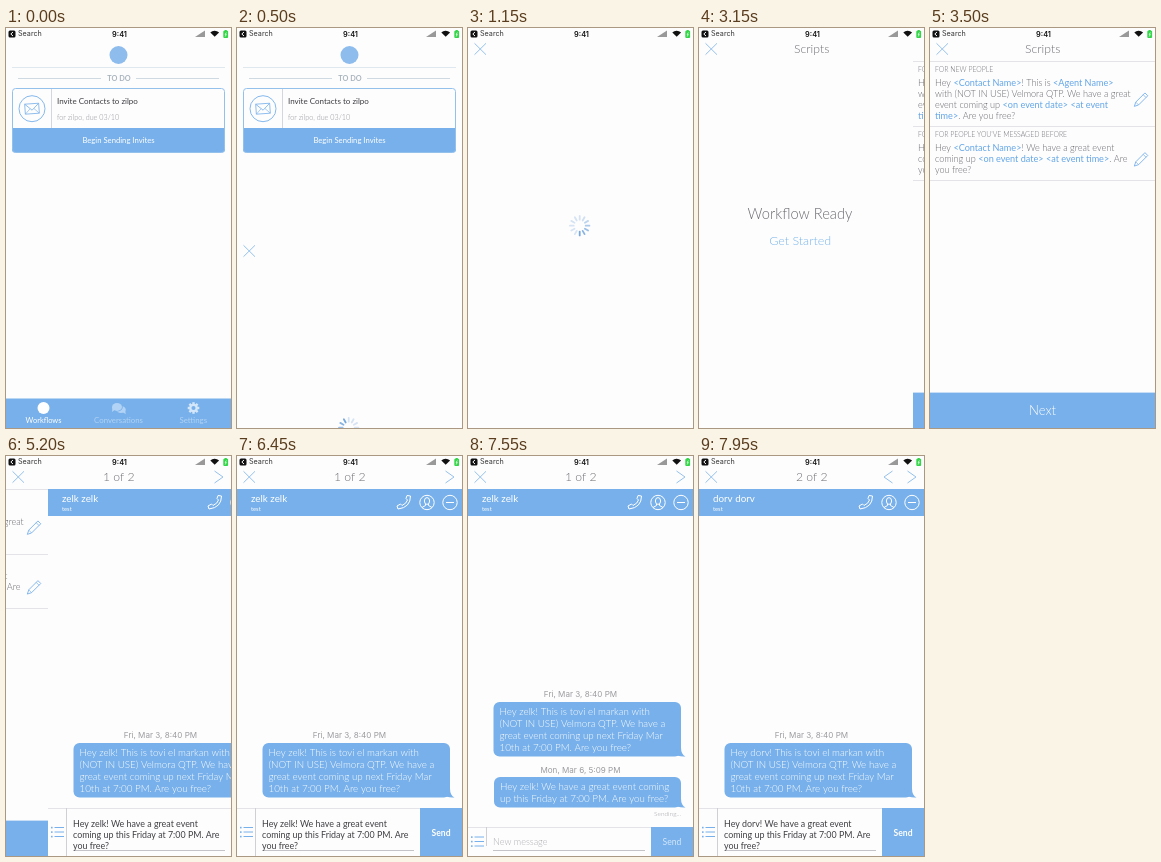
These frames come from a looping animation (225x400 px, 8 s). An HTML page with a canvas:

```html
<!DOCTYPE html>
<html lang="en">
<head>
<meta charset="utf-8">
<title>Messaging workflow</title>
<style>
html, body { margin: 0; width: 100%; height: 100%; overflow: hidden; background: #fefdfe; }
canvas { display: block; width: 100vw; height: 100vh; }
</style>
</head>
<body>
<canvas id="stage"></canvas>
<script>
const W = 225, H = 400, LOOP = 8000;
const BLUE = '#77b0ea', PALE = '#94c1ec', PAPER = '#fefdfe', RULE = '#e4e4e8', WHITE = '#fff';
const canvas = document.getElementById('stage');
const c = canvas.getContext('2d');

const clamp = v => Math.max(0, Math.min(1, v));
const easeOut = v => 1 - Math.pow(1 - v, 3);
const glide = (t, start, length) => easeOut(clamp((t - start) / length));
const mix = (a, b, k) => a + (b - a) * k;

function at(x, y, draw) {
  c.save();
  c.translate(x, y);
  draw();
  c.restore();
}

function box(x, y, w, h, color) {
  c.fillStyle = color;
  c.fillRect(x, y, w, h);
}

function roundBox(x, y, w, h, r) {
  c.beginPath();
  c.roundRect(x, y, w, h, r);
}

function line(color, width, ...p) {
  c.strokeStyle = color;
  c.lineWidth = width;
  c.beginPath();
  for (let i = 0; i < p.length; i += 2) c.lineTo(p[i], p[i + 1]);
  c.stroke();
}

function disc(x, y, r, color) {
  c.fillStyle = color;
  c.beginPath();
  c.arc(x, y, r, 0, 7);
  c.fill();
}

function ring(x, y, r, color, width = 1) {
  c.strokeStyle = color;
  c.lineWidth = width;
  c.beginPath();
  c.arc(x, y, r, 0, 7);
  c.stroke();
}

function text(str, x, y, size, color, weight = 400, align = 'left', family = 'Lato') {
  c.font = `${weight} ${size}px ${family}, sans-serif`;
  c.fillStyle = color;
  c.textAlign = align;
  c.fillText(str, x, y);
}

// Placeholders in angle brackets are set in blue.
function script(str, x, y) {
  for (const run of str.split(/(<[^>]*>?|^[a-z]+>)/)) {
    if (!run) continue;
    const field = /[<>]/.test(run);
    text(run, x, y, 9.1, field ? '#62a6e6' : '#66666b', field ? 400 : 300);
    x += c.measureText(run).width;
  }
}

function statusBar() {
  c.fillStyle = '#111';
  roundBox(2.5, 2.5, 7, 7, 1.5);
  c.fill();
  line(WHITE, 1, 7, 4, 4.8, 6, 7, 8);
  text('Search', 12, 8.4, 7.2, '#333', 400, 'left', 'Inter');
  text('9:41', 113.5, 8.6, 7.4, '#111', 600, 'center', 'Inter');
  c.fillStyle = '#999';
  c.beginPath();
  c.moveTo(189, 9);
  c.lineTo(199, 9);
  c.lineTo(199, 2.5);
  c.fill();
  c.fillStyle = '#111';
  c.beginPath();
  c.moveTo(208.7, 8.7);
  c.arc(208.7, 8.7, 6, -Math.PI * .76, -Math.PI * .24);
  c.fill();
  c.fillStyle = '#35d54a';
  roundBox(217.3, 2.8, 4.8, 7.2, 1);
  c.fill();
  box(218.6, 2, 2.2, 1, '#35d54a');
  line('#eaffea', .8, 220.3, 4.5, 219.2, 6.5, 220.3, 6.5, 219.2, 8.5);
}

function envelope() {
  at(26, 80.7, () => {
    c.rotate(-.07);
    c.strokeStyle = BLUE;
    c.lineWidth = .8;
    c.strokeRect(-7, -5, 14, 10);
    line(BLUE, .8, -7, -5, 0, 1.5, 7, -5);
    line(BLUE, .6, -7, 5, -2, 0);
    line(BLUE, .6, 7, 5, 2, 0);
  });
}

function gear(x, y, color) {
  for (let i = 0; i < 8; i++) {
    at(x, y, () => {
      c.rotate(i * Math.PI / 4);
      box(-1.2, -5.8, 2.4, 3, color);
    });
  }
  ring(x, y, 3.2, color, 2.3);
}

function talk(x, y, color) {
  const bubble = (dx, dy, rx, ry, side) => {
    c.beginPath();
    c.ellipse(x + dx, y + dy, rx, ry, 0, 0, 7);
    c.fill();
    c.beginPath();
    c.moveTo(x + dx + side * 1, y + dy + 2);
    c.lineTo(x + dx + side * rx, y + dy + ry + 1.2);
    c.lineTo(x + dx + side * (rx - .5), y + dy);
    c.fill();
  };
  c.fillStyle = color;
  bubble(2.5, 1.5, 4.7, 3.6, 1);
  c.fillStyle = BLUE;
  c.beginPath();
  c.ellipse(x - 1.5, y - 1, 5.8, 4.6, 0, 0, 7);
  c.fill();
  c.fillStyle = color;
  bubble(-1.5, -1, 5, 3.9, -1);
}

function home() {
  disc(112.5, 27, 9, '#8dbced');
  line('#dfe7ef', 1, 6, 39.5, 219, 39.5);
  line('#ced9e1', 1, 12, 50.5, 95, 50.5);
  line('#ced9e1', 1, 130, 50.5, 213, 50.5);
  text('TO DO', 113, 52.8, 7.3, '#a9b4bd', 700, 'center');

  c.save();
  roundBox(6, 60.5, 213, 64, 3);
  c.clip();
  box(6, 100, 214, 26, BLUE);
  c.restore();
  c.strokeStyle = PALE;
  c.lineWidth = 1;
  roundBox(6.5, 60.5, 212, 64, 3);
  c.stroke();
  line('#d3d6da', 1, 45.5, 61, 45.5, 100);
  ring(26, 80.7, 13, BLUE, .9);
  envelope();
  text('Invite Contacts to zilpo', 51, 75.8, 8, '#3c3c40');
  text('for zilpo, due 03/10', 51, 91.5, 7.2, '#8f8f94', 300);
  text('Begin Sending Invites', 112.5, 115, 7.7, WHITE, 400, 'center');

  const dim = '#b2d3f5';
  box(0, 370.5, W, 29.5, BLUE);
  disc(37.5, 380, 6, WHITE);
  talk(112.5, 380, dim);
  gear(187.5, 380, '#d3e6fa');
  text('Workflows', 37.5, 394.8, 7.5, WHITE, 400, 'center');
  text('Conversations', 112.5, 394.6, 7.8, dim, 400, 'center');
  text('Settings', 187.3, 394.6, 7.9, dim, 400, 'center');
}

function spinner(t) {
  const head = (Math.floor(t * 12 / 1000) + 5) % 12;
  for (let i = 0; i < 12; i++) {
    const age = (head - i + 12) % 12;
    at(111.7, 197.7, () => {
      c.rotate(i * Math.PI / 6);
      c.lineCap = 'round';
      c.globalAlpha *= Math.max(.3, 1 - age * .13);
      line('#78a9dc', 1.8, 0, -6, 0, -9.7);
    });
  }
}

function readyPage(t) {
  const shown = clamp((t - 1700) / 300);
  at(0, 0, () => {
    c.globalAlpha = 1 - shown;
    if (shown < 1) spinner(t);
  });
  at(0, 0, () => {
    c.globalAlpha = shown;
    text('Workflow Ready', 112, 190.6, 14.7, '#6b6b70', 300, 'center');
    text('Get Started', 112.2, 216.8, 12.5, '#74b3e8', 300, 'center');
  });
}

function pencil(x, y) {
  at(x, y, () => {
    c.rotate(Math.PI / 4);
    c.lineJoin = 'round';
    line(BLUE, .85, -2, -8, 2, -8, 2, 5, 0, 9, -2, 5, -2, -8);
    line(BLUE, .7, -2, -5.5, 2, -5.5);
    line(BLUE, .6, -2, 5, 2, 5);
  });
}

function scriptsPage() {
  for (const y of [33.5, 98.5, 152.5]) line(RULE, 1, 0, y, W, y);
  text('FOR NEW PEOPLE', 5, 43.8, 6.9, '#6f6f74', 300);
  ['Hey <Contact Name>! This is <Agent Name>',
   'with (NOT IN USE) Velmora QTP. We have a great',
   'event coming up <on event date> <at event',
   'time>. Are you free?'].forEach((s, i) => script(s, 5, 57.8 + i * 11));
  text('FOR PEOPLE YOU’VE MESSAGED BEFORE', 5, 108.8, 6.9, '#6f6f74', 300);
  ['Hey <Contact Name>! We have a great event',
   'coming up <on event date> <at event time>. Are',
   'you free?'].forEach((s, i) => script(s, 5, 122.8 + i * 11));
  pencil(210.7, 72);
  pencil(210.7, 131.7);
  box(0, 364.6, W, 35.4, BLUE);
  text('Next', 112.5, 387, 13.1, WHITE, 300, 'center');
}

function handset(x, y) {
  at(x, y, () => {
    c.strokeStyle = WHITE;
    c.lineWidth = 1;
    c.lineJoin = 'round';
    c.beginPath();
    c.moveTo(3, -7);
    c.lineTo(6.5, -6.5);
    c.quadraticCurveTo(6.5, 5, -6, 6.5);
    c.lineTo(-7, 3.5);
    c.lineTo(-3.5, 1.5);
    c.lineTo(-2, 3);
    c.quadraticCurveTo(2.5, 1, 3.5, -2.5);
    c.lineTo(2, -4);
    c.closePath();
    c.stroke();
  });
}

function person(x, y) {
  ring(x, y, 7.2, WHITE);
  c.beginPath();
  c.ellipse(x, y - 1.5, 2.6, 3.4, 0, 0, 7);
  c.stroke();
  line(WHITE, 1, x - 5, y + 5, x - 1.5, y + 3, x - 1.5, y + 1.5);
  line(WHITE, 1, x + 5, y + 5, x + 1.5, y + 3, x + 1.5, y + 1.5);
}

function bubble(x, y, h, lines) {
  c.fillStyle = BLUE;
  roundBox(x, y, 213 - x, h, 6);
  c.fill();
  c.beginPath();
  c.moveTo(213, y + h - 9);
  c.quadraticCurveTo(213, y + h - 2, 217.5, y + h);
  c.quadraticCurveTo(210, y + h + .5, 205, y + h - 3);
  c.fill();
  lines.forEach((s, i) => text(s, x + 6, y + 12.5 + i * 12.3, 9.8, WHITE, 300));
}

function stamp(str, y) {
  text(str, 112.5, y, 8.1, '#9b9b9f', 400, 'center', 'Inter');
}

function composer(name, sent) {
  const top = mix(352, 371, sent), mid = (top + H) / 2, empty = sent > 0;
  box(0, top, W, H - top, PAPER);
  line(RULE, 1, 0, top + .5, W, top + .5);
  line('#cfcfd4', 1, 18.5, top, 18.5, mix(400, 390, sent));
  for (const dy of [-4.5, 0, 4.5]) {
    box(3, mid + dy - .7, 1.6, 1.6, BLUE);
    line(BLUE, 1, 6.5, mid + dy, 16, mid + dy);
  }
  line('#c4c4c8', 1, 25, 394.5, 177, 394.5);
  if (empty) {
    text('New message', 25, 389, 9.1, '#adadb1', 300);
  } else {
    [`Hey ${name}! We have a great event`,
     'coming up this Friday at 7:00 PM. Are',
     'you free?'].forEach((s, i) => text(s, 25, 371 + i * 11.1, 8.9, '#3f3f43'));
  }
  box(183, top, 42, H - top, BLUE);
  text('Send', 204, mid + 3.8, 8.6, empty ? '#d3e6fa' : WHITE, empty ? 400 : 700, 'center');
}

function chatPage(name, sent) {
  box(0, 33, W, H - 33, PAPER);
  const lift = -41 * sent;
  stamp('Fri, Mar 3, 8:40 PM', 282.3 + lift);
  bubble(25.5, 287 + lift, 54.5, [
    `Hey ${name}! This is tovi el markan with`,
    '(NOT IN USE) Velmora QTP. We have a',
    'great event coming up next Friday Mar',
    '10th at 7:00 PM. Are you free?']);
  if (sent > 0) {
    stamp('Mon, Mar 6, 5:09 PM', 358 + lift);
    bubble(26, 362 + lift, 30.5, [
      `Hey ${name}! We have a great event coming`,
      'up this Friday at 7:00 PM. Are you free?']);
    text('Sending...', 213, 400.5 + lift, 6.5, '#9d9da1', 300, 'right');
  }
  composer(name, sent);
  box(0, 33, W, 27, BLUE);
  text(`${name} ${name}`, 14, 46.3, 9.8, WHITE);
  text('test', 14, 55, 5.8, WHITE);
  handset(167, 46.5);
  person(190, 46.5);
  ring(213, 46.5, 7.2, WHITE);
  line(WHITE, 1, 209, 46.5, 217, 46.5);
}

function titleBar(t) {
  line(PALE, 1, 6.5, 15.3, 18, 26.7);
  line(PALE, 1, 18, 15.3, 6.5, 26.7);
  const label = t < 3143 ? '' : t < 5029 ? 'Scripts' : t < 7740 ? '1 of 2' : '2 of 2';
  text(label, 112.7, 25, 12.2, '#6b6b70', 300, 'center');
  if (t >= 5029) line(PALE, 1, 208.5, 15, 217, 21, 208.5, 27);
  if (t >= 7740) line(PALE, 1, 193.5, 15, 185, 21, 193.5, 27);
}

function flow(t) {
  box(0, 0, W, H, PAPER);
  // Pages sit side by side and scroll left one at a time.
  const scroll = glide(t, 3143.3, 400) + glide(t, 5029, 400) + glide(t, 7740, 210);
  const sent = glide(t, 6930, 170);
  const pages = [
    () => readyPage(t),
    scriptsPage,
    () => chatPage('zelk', sent),
    () => chatPage('dorv', 0)
  ];
  pages.forEach((page, i) => {
    const x = Math.round((i - scroll) * W);
    if (Math.abs(x) < W) at(x, 0, page);
  });
  titleBar(t);
}

function render(t) {
  box(0, 0, W, H, PAPER);
  const rise = glide(t, 390, 540);
  if (rise < 1) home();
  if (rise > 0) at(0, Math.round((1 - rise) * H), () => flow(t));
  statusBar();
}

function fit() {
  const ratio = window.devicePixelRatio || 1;
  canvas.width = Math.round(innerWidth * ratio);
  canvas.height = Math.round(innerHeight * ratio);
}

let begin = null;
function tick(now) {
  if (begin === null) begin = now;
  c.setTransform(canvas.width / W, 0, 0, canvas.height / H, 0, 0);
  render((now - begin) % LOOP);
  requestAnimationFrame(tick);
}

addEventListener('resize', fit);
fit();
requestAnimationFrame(tick);
</script>
</body>
</html>
```
